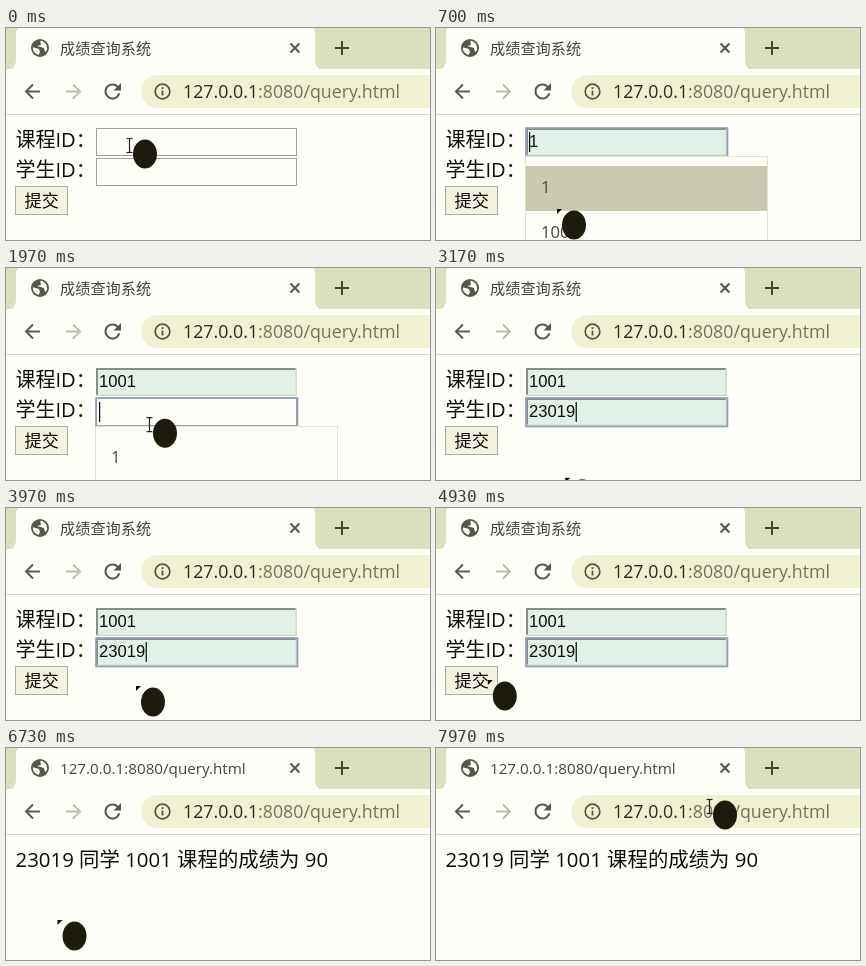
Recreate the animation shown at these times as an HTML page with a canvas. Size 424x212 px, loop 8 s.

```html
<!DOCTYPE html>
<html lang="zh-CN">
<head>
<meta charset="utf-8">
<style>
html, body { margin: 0; width: 100%; height: 100%; overflow: hidden; background: #fffffa; }
canvas { display: block; width: 424px; height: 212px; }
</style>
</head>
<body>
<canvas id="stage"></canvas>
<script>
const W = 424, H = 212, LOOP = 8000;
const canvas = document.getElementById('stage');
const scale = window.devicePixelRatio || 1;
canvas.width = W * scale;
canvas.height = H * scale;
const g = canvas.getContext('2d');

const UI = '"Open Sans", "Noto Sans CJK SC", "Noto Sans CJK", sans-serif';
const FIELD = '"Liberation Sans", sans-serif';
const URL_HOST = '127.0.0.1', URL_REST = ':8080/query.html';
const PAGE = '#fffffa', INK = '#0c0c08', ICON = '#55564a';

// Moments of the interaction, in ms
const OPEN1 = 230, PICK1 = 1050, OPEN2 = 1700, PICK2 = 2850, RESULT = 5650;

// Pointer figure: time, x, y
const path = [
  [0, 139, 126], [230, 139, 126], [700, 138, 197], [850, 139, 214],
  [1080, 139, 214], [1550, 159, 165], [1970, 159, 165], [2500, 146, 236],
  [3000, 146, 236], [3700, 147, 194], [4050, 147, 194], [4800, 69, 188],
  [5100, 68.5, 188], [7150, 68.5, 188], [7500, 112, 137], [7780, 245, 52],
  [7970, 289, 67]
];

function pointerAt(t) {
  for (let i = 1; i < path.length; i++) {
    const [t0, x0, y0] = path[i - 1], [t1, x1, y1] = path[i];
    if (t <= t1) {
      const k = (t - t0) / (t1 - t0);
      return { x: x0 + (x1 - x0) * k, y: y0 + (y1 - y0) * k };
    }
  }
  const [, x, y] = path[path.length - 1];
  return { x, y };
}

function rect(x, y, w, h, color) {
  g.fillStyle = color;
  g.fillRect(x, y, w, h);
}

function frame(x, y, w, h, color, width = 1) {
  g.strokeStyle = color;
  g.lineWidth = width;
  g.strokeRect(x, y, w, h);
}

function text(s, x, y, size, color, family = UI) {
  g.font = `${size}px ${family}`;
  g.fillStyle = color;
  g.fillText(s, x, y);
  return g.measureText(s).width;
}

function trace(points) {
  g.beginPath();
  points.forEach(([x, y], i) => i ? g.lineTo(x, y) : g.moveTo(x, y));
}

function line(points, color, width) {
  trace(points);
  g.strokeStyle = color;
  g.lineWidth = width;
  g.stroke();
}

function polygon(points, color) {
  trace(points);
  g.fillStyle = color;
  g.fill();
}

function ellipse(x, y, rx, ry, color) {
  g.beginPath();
  g.ellipse(x, y, rx, ry, 0, 0, Math.PI * 2);
  g.fillStyle = color;
  g.fill();
}

function ring(x, y, r, from, to, width) {
  g.beginPath();
  g.arc(x, y, r, from, to);
  g.strokeStyle = ICON;
  g.lineWidth = width;
  g.stroke();
}

function globe(x, y) {
  ellipse(x, y, 9, 9, ICON);
  g.save();
  g.beginPath();
  g.arc(x, y, 7.2, 0, Math.PI * 2);
  g.clip();
  g.translate(x, y);
  polygon([[-8, -1], [-1, 1], [0, 4], [-2, 8], [-8, 6]], PAGE);
  polygon([[0, -8], [1, -3], [-3, -2], [4, 0], [5, 4], [8, 2], [7, -7]], PAGE);
  g.restore();
}

function arrow(x, y, dir, color) {
  line([[x - 7 * dir, y], [x + 7 * dir, y]], color, 1.9);
  line([[x, y - 7], [x + 7 * dir, y], [x, y + 7]], color, 1.9);
}

function browser(title) {
  rect(0, 0, W, 42, '#dcdec0');
  rect(0, 41, W, 46, PAGE);
  g.beginPath();
  g.moveTo(0, 42);
  g.quadraticCurveTo(10, 42, 10, 32);
  g.lineTo(10, 6);
  g.quadraticCurveTo(10, -2, 18, -2);
  g.lineTo(301, -2);
  g.quadraticCurveTo(309, -2, 309, 6);
  g.lineTo(309, 32);
  g.quadraticCurveTo(309, 42, 319, 42);
  g.fillStyle = PAGE;
  g.fill();

  globe(34, 20);
  text(title, 54, 25.5, 15.2, '#44453a');
  line([[284.5, 15.5], [293.5, 24.5]], '#505140', 1.8);
  line([[293.5, 15.5], [284.5, 24.5]], '#505140', 1.8);
  line([[329, 20], [343, 20]], '#45463a', 2);
  line([[336, 13], [336, 27]], '#45463a', 2);

  arrow(27, 63.5, -1, ICON);
  arrow(67, 63.5, 1, '#b9baa8');
  ring(106.5, 63.5, 7, 0.25, Math.PI * 1.76, 2);
  polygon([[115, 55], [115, 62.5], [107.5, 62.5]], ICON);

  g.beginPath();
  g.roundRect(135, 47, 320, 33, 16.5);
  g.fillStyle = '#f0f1d2';
  g.fill();
  ring(156.5, 63.5, 7.3, 0, Math.PI * 2, 1.7);
  rect(155.6, 62.5, 1.8, 5, ICON);
  rect(155.6, 59.2, 1.8, 1.8, ICON);
  const w = text(URL_HOST, 177, 70, 17.75, '#2b2c24');
  text(URL_REST, 177 + w, 70, 17.75, '#727362');
  rect(0, 86, W, 1, '#d8d9c2');
}

function field(y, value, focusedAt, caretAtStart, t) {
  const focused = focusedAt !== null;
  rect(90, y, 201, 28, value ? '#e2f1e8' : PAGE);
  if (value) {
    rect(90, y, 201, 2, '#8b8c82');
    rect(90, y, 2, 28, '#8b8c82');
    rect(90, y + 26.5, 201, 1.5, '#d6d7c4');
    rect(289.5, y, 1.5, 28, '#d6d7c4');
  } else {
    frame(90.5, y + 0.5, 200, 27, '#a0a194');
  }
  if (focused) frame(90, y, 201.5, 28.5, '#8b9cc0', 1.6);
  const w = text(value, 93, y + 19, 16.6, INK, FIELD);
  if (focused && (t - focusedAt) % 1000 < 500) {
    rect(caretAtStart ? 93 : 93.5 + w, y + 4, 1.2, 20, INK);
  }
}

function dropdown(y, rows, hover) {
  rect(89, y, 243, H - y, PAGE);
  frame(89.5, y + 0.5, 242, H, '#e2e3cc');
  rows.forEach((row, i) => {
    const top = y + 10 + i * 45;
    if (i === hover) rect(90, top, 241, 45, '#cacab0');
    text(row, 105, top + 27, 16.6, '#45463a');
  });
}

function form(t, p) {
  const open1 = t >= OPEN1 && t < PICK1;
  const open2 = t >= OPEN2 && t < PICK2;
  const rows1 = ['1', '1001'], rows2 = ['1', '23019'];
  const hoverRow = top => Math.floor((p.y - 16 - top) / 45);
  const hover1 = open1 ? hoverRow(138) : -1;
  const hover2 = open2 ? hoverRow(168) : -1;
  const value1 = t >= PICK1 ? '1001' : rows1[hover1] || '';
  const value2 = t >= PICK2 ? '23019' : rows2[hover2] || '';
  const focus1 = t < OPEN1 || t >= OPEN2 ? null : t < PICK1 ? OPEN1 : PICK1;
  const focus2 = t < OPEN2 ? null : t < PICK2 ? OPEN2 : PICK2;

  text('课程ID：', 9.5, 119, 20, INK);
  text('学生ID：', 9.5, 149, 20, INK);
  field(100, value1, focus1, open1, t);
  field(130, value2, focus2, open2, t);

  rect(9, 158, 53, 29, '#f2f2de');
  frame(9.5, 158.5, 52, 28, '#acad98');
  text('提交', 18.5, 179, 17.2, INK);

  if (open1) dropdown(128, rows1, hover1);
  if (open2) dropdown(158, rows2, hover2);
}

function isTextCursor(t, x, y) {
  if (y > 47 && y < 80 && x > 170) return true;
  if (t >= RESULT) return y > 100 && y < 125 && x > 10 && x < 322;
  const bottom = t >= OPEN1 && t < PICK1 ? 128 : 159;
  return x > 90 && x < 291 && y > 100 && y < bottom;
}

function pointer(t, p) {
  ellipse(p.x, p.y, 12, 14.5, '#1d1b0d');
  const x = p.x - 15.5, y = p.y - 8.5;
  if (isTextCursor(t, x, y)) {
    line([[x, y - 7], [x, y + 7]], '#222', 1.2);
    line([[x - 3, y - 7], [x + 3, y - 7]], '#222', 1.2);
    line([[x - 3, y + 7], [x + 3, y + 7]], '#222', 1.2);
  } else {
    const tx = p.x - 17, ty = p.y - 16;
    polygon([[tx, ty], [tx + 5, ty], [tx, ty + 5]], INK);
  }
}

function draw(t) {
  const p = pointerAt(t), done = t >= RESULT;
  g.setTransform(scale, 0, 0, scale, 0, 0);
  rect(0, 0, W, H, PAGE);
  browser(done ? URL_HOST + URL_REST : '成绩查询系统');
  if (done) text('23019 同学 1001 课程的成绩为 90', 9.5, 119, 20.4, INK);
  else form(t, p);
  pointer(t, p);
}

const start = performance.now();
function tick() {
  draw((performance.now() - start) % LOOP);
  requestAnimationFrame(tick);
}
tick();
</script>
</body>
</html>
```
